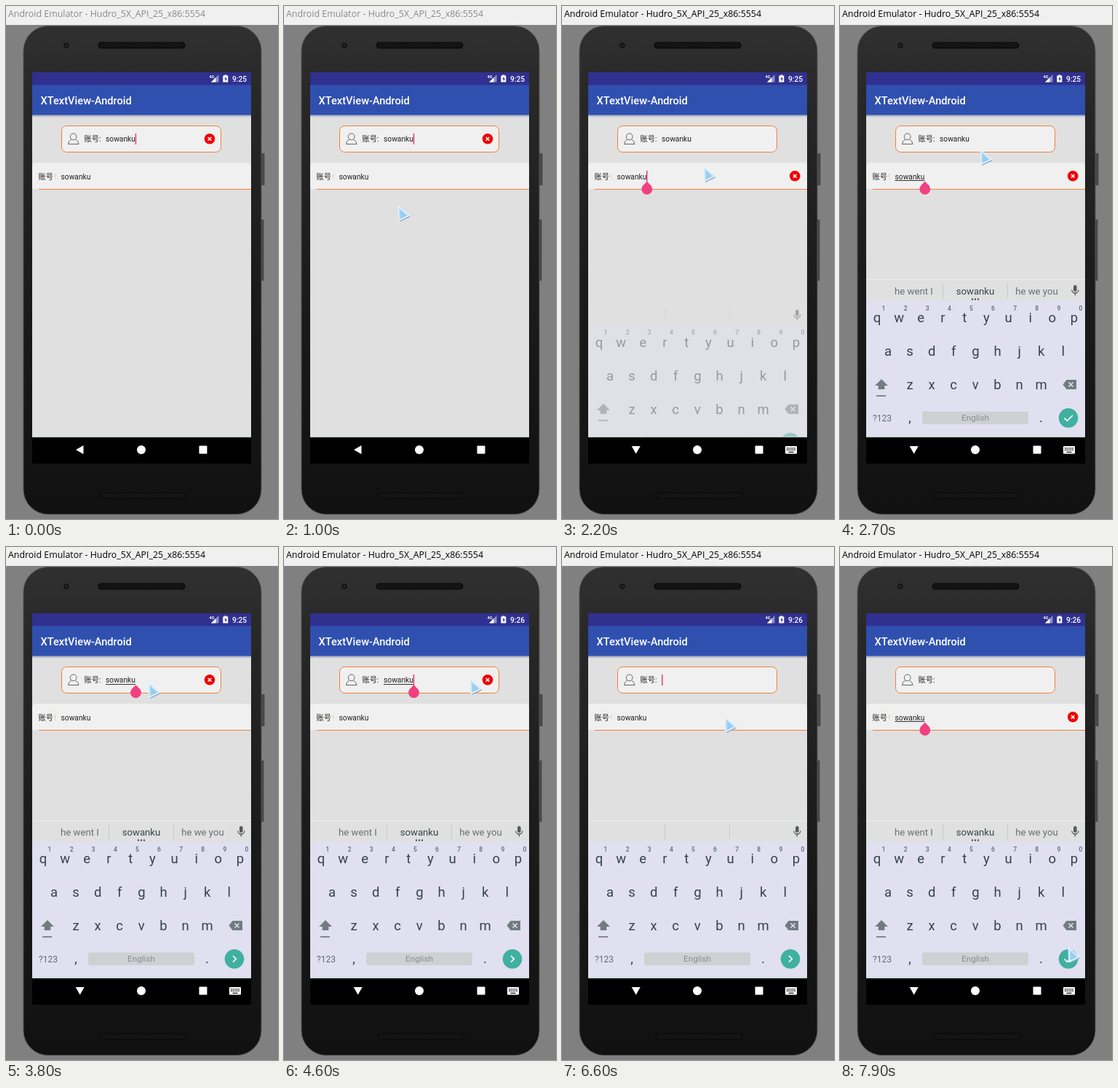
An HTML page for the animation above (8 s loop, 374 px wide and 704 px high).

```html
<!DOCTYPE html>
<html lang="en">
<head>
<meta charset="utf-8">
<title>Text field demo</title>
<style>
  html, body { margin: 0; width: 100%; height: 100%; overflow: hidden; background: #808080; }
  svg { display: block; width: 374px; height: 704px; }
  text { font-family: Roboto, "Noto Sans CJK SC", "Noto Sans CJK", sans-serif; white-space: pre; }
  .mid { text-anchor: middle; }
  .field { font-size: 10.25px; fill: #202020; }
  .key { font-size: 18.5px; fill: #37434a; }
  .word { font-size: 13.2px; fill: #667076; }
</style>
</head>
<body>
<svg viewBox="0 0 374 704">
  <defs>
    <linearGradient id="body" x2="0" y2="1">
      <stop offset="0" stop-color="#303030"/>
      <stop offset=".14" stop-color="#282828"/>
      <stop offset=".5" stop-color="#1c1c1c"/>
      <stop offset="1" stop-color="#111"/>
    </linearGradient>
    <linearGradient id="shade" x2="0" y2="1">
      <stop offset="0" stop-color="#9098b8"/>
      <stop offset="1" stop-color="#e0e0e0"/>
    </linearGradient>
    <pattern id="mesh" width="4" height="4" patternUnits="userSpaceOnUse">
      <path d="M0 4L4 0" stroke="#2c2c2c"/>
    </pattern>
    <clipPath id="above"><rect x="36" y="91" width="301" height="500"/></clipPath>
    <g id="clear">
      <circle r="7.3" fill="#f00000"/>
      <path d="M-2.3-2.3L2.3 2.3M2.3-2.3L-2.3 2.3" stroke="#fff" stroke-width="1.5"/>
    </g>
    <path id="drop" d="M0-10.5L5.2-5.2A7.4 7.4 0 1 1-5.2-5.2Z" fill="#f04080"/>
    <rect id="caret" width="1.5" height="15" fill="#e83c78"/>
    <g id="slot">
      <rect width="120" height="9" rx="4.5" fill="#0c0c0c"/>
      <rect x="2" y="1.5" width="116" height="6" rx="3" fill="url(#mesh)"/>
    </g>
  </defs>

  <rect width="374" height="704" fill="#808080"/>
  <rect width="374" height="26" fill="#f0f0f0"/>
  <text id="title" x="3" y="15.3" style="font:12.4px 'Open Sans','Noto Sans',sans-serif">Android Emulator - Hudro_5X_API_25_x86:5554</text>

  <!-- phone -->
  <path d="M351 202h4.500v44H351zM350 293h4.500v84H350z" fill="#484848"/>
  <rect x="24" y="27.500" width="327" height="670" rx="34" fill="url(#body)" stroke="#505050"/>
  <circle cx="83" cy="54" r="3.8" fill="#141418"/>
  <circle cx="83" cy="54" r="1.5" fill="#2c2c38"/>
  <use href="#slot" x="126.5" y="49.5"/>
  <use href="#slot" x="128.5" y="667.5"/>

  <!-- app -->
  <rect x="36" y="91" width="301" height="537" fill="#e0e0e0"/>
  <rect x="36" y="149" width="301" height="4" fill="url(#shade)"/>
  <rect x="36" y="91" width="301" height="18" fill="#303090"/>
  <rect x="36" y="108.5" width="301" height="41" fill="#3050b0"/>
  <text x="47.5" y="134.5" font-size="14.64" font-weight="500" fill="#fff">XTextView-Android</text>
  <g fill="#fff">
    <text x="279.5" y="99" font-size="5.5" font-weight="700">4G</text>
    <path d="M282 104.500L292.500 94V104.500Z" fill="#8890c4"/>
    <path d="M282 104.500L288.500 98V104.500Z"/>
    <path d="M300.300 94.500h3v1h2v9h-7v-9h2z"/>
    <path d="M302.500 96.500l-2.200 4h1.500v3l2.200-4h-1.500z" fill="#303090"/>
    <text id="clock" x="331" y="103.7" font-size="10.2" font-weight="500" text-anchor="end"></text>
  </g>

  <rect x="76.5" y="164.5" width="219" height="36" rx="7" fill="#f0f0f0" stroke="#f08038"/>
  <g fill="none" stroke="#666">
    <circle cx="92.7" cy="179.3" r="4.4"/>
    <path d="M89.800 183Q85.800 185 85.500 189.500H100Q99.500 185 95.600 183"/>
  </g>
  <text class="field" x="107.5" y="186.2">账号:</text>
  <text class="field" id="val1" x="137" y="186.2">sowanku</text>
  <path d="M36 251V221Q36 215 42 215H331Q337 215 337 221V251Z" fill="#f0f0f0"/>
  <path d="M45 251.500H337" stroke="#f08038"/>
  <text class="field" x="44.5" y="237.5">账号</text>
  <text class="field" x="66.5" y="237.5" style="fill:#d4cc98">!</text>
  <text class="field" x="75.5" y="237.5">sowanku</text>
  <path id="line1" d="M137 188.500h41" stroke="#333"/>
  <path id="line2" d="M75.500 239.500h41" stroke="#333"/>
  <use id="clear1" href="#clear" x="280" y="182.3"/>
  <use id="clear2" href="#clear" x="320.2" y="233.3"/>
  <use id="caret1" href="#caret" y="175"/>
  <use id="caret2" href="#caret" x="116" y="226"/>

  <!-- keyboard -->
  <g clip-path="url(#above)">
    <g id="board">
      <rect x="36" y="375" width="301" height="30" fill="#e0e0e0"/>
      <path d="M36 375.500H337" stroke="#ececec"/>
      <path d="M141.500 381v20M230.500 381v20" stroke="#cacaca"/>
      <rect x="36" y="404.5" width="301" height="187" fill="#e0e0f0"/>
      <g id="words">
        <text class="word mid" x="101.5" y="395.5">he went I</text>
        <text class="word mid" x="186" y="395.5" style="fill:#37434a">sowanku</text>
        <text class="word mid" x="270.5" y="395.5">he we you</text>
        <path d="M182 402.500h0m4 0h0m4 0h0" stroke="#37434a" stroke-width="2.3" stroke-linecap="round"/>
      </g>
      <rect x="321" y="383" width="4.6" height="9" rx="2.3" fill="#555c60"/>
      <path d="M318.800 389.500a4.500 4.500 0 0 0 9 0M323.300 394v3.500" fill="none" stroke="#555c60" stroke-width="1.3"/>
      <g id="keys"></g>
      <path d="M57 512l9 9h-4.700v5h-8.600v-5H48z" fill="#707c80"/>
      <path d="M50 535h13" stroke="#808890" stroke-width="2"/>
      <path d="M306.500 519.500l5-6.500H325V526H311.500z" fill="#707c80"/>
      <path d="M314.500 516.500l6 6m0-6l-6 6" stroke="#e0e0f0" stroke-width="1.5"/>
      <text class="mid" x="58" y="569.5" font-size="12" fill="#606a70">?123</text>
      <rect x="113" y="556.5" width="146" height="17.5" rx="3" fill="#ced0d2"/>
      <text class="mid" x="186" y="569.3" font-size="11.7" fill="#868e94">English</text>
      <circle cx="314" cy="565.3" r="13.3" fill="#40b0a0"/>
      <g fill="none" stroke="#fff" stroke-width="1.7">
        <path id="done" d="M308.500 565.500l3.800 3.800 7.500-7.500"/>
        <path id="next" d="M312 561l4.300 4.300-4.300 4.300"/>
      </g>
    </g>
    <use id="drop1" href="#drop" x="178.5" y="199.7"/>
    <use id="drop2" href="#drop" x="116.8" y="251.2"/>
  </g>

  <!-- navigation bar -->
  <rect x="36" y="592" width="301" height="36" fill="#000"/>
  <path d="M36 591.500H337" stroke="#b4ccb8"/>
  <g fill="#fff">
    <path id="back" d="M96 609L106.500 603V615Z"/>
    <path id="down" d="M95.700 604H107.700L101.700 614.500Z"/>
    <circle cx="186" cy="609" r="6"/>
    <rect x="265.5" y="603.5" width="11" height="11" rx="1"/>
    <g id="pad">
      <rect x="307" y="604" width="16" height="10.5" rx="1"/>
      <path d="M309 606.700h12M309 609.200h12" stroke="#000" stroke-width="1.4" stroke-dasharray="1.4 1.2"/>
      <path d="M311.500 612.200h7" stroke="#000" stroke-width="1.2"/>
    </g>
  </g>

  <g id="mouse" stroke-linejoin="round">
    <path d="M3 21L16.500 14.500" stroke="#88a4c0" stroke-width="2"/>
    <path d="M1.200 1L16 13.500L2 20.500Z" fill="#b4dcf6" stroke="#e4f2fc" stroke-width="1.5"/>
    <path d="M4 6.500L12.500 13.500L4.500 17.500Z" fill="#98ccf0"/>
  </g>
</svg>
<script>
const $ = id => document.getElementById(id);
const show = (id, on) => $(id).style.display = on ? "" : "none";
const within = (t, spans) => spans.some(([a, b]) => t >= a && t < b);

// [letters, first centre, baseline]
const rows = [["qwertyuiop", 51, 434], ["asdfghjkl", 66, 480], ["zxcvbnm", 96, 526]];
let keys = "";
for (const [letters, x, y] of rows)
  [...letters].forEach((c, i) => {
    keys += `<text class="key mid" x="${x + i * 30.1}" y="${y}">${c}</text>`;
    if (y == 434)
      keys += `<text class="mid" x="${60 + i * 30.1}" y="417.5" font-size="8.5" font-weight="500" fill="#5c666c">${(i + 1) % 10}</text>`;
  });
keys += '<text class="key mid" x="96" y="571">,</text><text class="key mid" x="276.5" y="571">.</text>';
$("keys").innerHTML = keys;

// [time, x, y]
const path = [
  [200, 107, 326], [500, 107, 326], [1400, 195, 233], [1900, 195, 233],
  [2700, 192, 197], [2800, 191, 194], [3300, 195, 186], [4100, 195, 186],
  [4200, 222, 186], [4300, 222, 186], [4800, 277, 178], [5900, 277, 178],
  [6600, 223, 233], [6800, 222, 235], [7000, 222, 235], [7200, 270, 338],
  [7600, 270, 338], [7900, 313, 549]
];

function pointer(t) {
  const i = path.findIndex(p => p[0] >= t);
  if (i < 1) return path[i < 0 ? path.length - 1 : 0];
  const a = path[i - 1], b = path[i], k = (t - a[0]) / (b[0] - a[0]);
  return a.map((v, j) => v + (b[j] - v) * k);
}

function draw(now) {
  const t = Math.floor(now % 8000 / 100) * 100;
  const second = within(t, [[1800, 3500], [6900, 8000]]);
  const cleared = t >= 5200;
  const open = t >= 2200;

  $("title").setAttribute("fill", t < 1500 ? "#888" : "#000");
  $("clock").textContent = t < 4200 ? "9:25" : "9:26";

  show("val1", !cleared);
  show("clear1", !second && !cleared);
  show("clear2", second);
  show("line1", within(t, [[3500, 5200]]));
  show("line2", within(t, [[2600, 3500], [7100, 8000]]));
  show("drop1", within(t, [[3500, 5500]]));
  show("drop2", within(t, [[2000, 3500], [6900, 8000]]));
  $("caret1").setAttribute("x", cleared ? 137 : 177.7);
  show("caret1", within(t, [[0, 100], [600, 1100], [1600, 1800], [3500, 3800],
    [4400, 4800], [5200, 5600], [6100, 6700]]));
  show("caret2", within(t, [[1800, 2300], [2800, 3300], [6900, 7200]]));

  const rise = Math.min(1, Math.max(0, (t - 2100) / 400));
  const ease = 1 - (1 - rise) ** 2;
  show("board", open);
  $("board").setAttribute("transform", `translate(0 ${(1 - ease) * 60})`);
  $("board").setAttribute("opacity", ease);
  show("words", within(t, [[2600, 3500], [3700, 5200], [7200, 8000]]));
  show("done", second);
  show("next", !second);
  show("back", !open);
  show("down", open);
  show("pad", open);

  const [, x, y] = pointer(t);
  show("mouse", t >= 200);
  $("mouse").setAttribute("transform", `translate(${Math.round(x)} ${Math.round(y)})`);
}

const start = performance.now();
function loop() {
  draw(performance.now() - start);
  requestAnimationFrame(loop);
}
loop();
</script>
</body>
</html>
```
